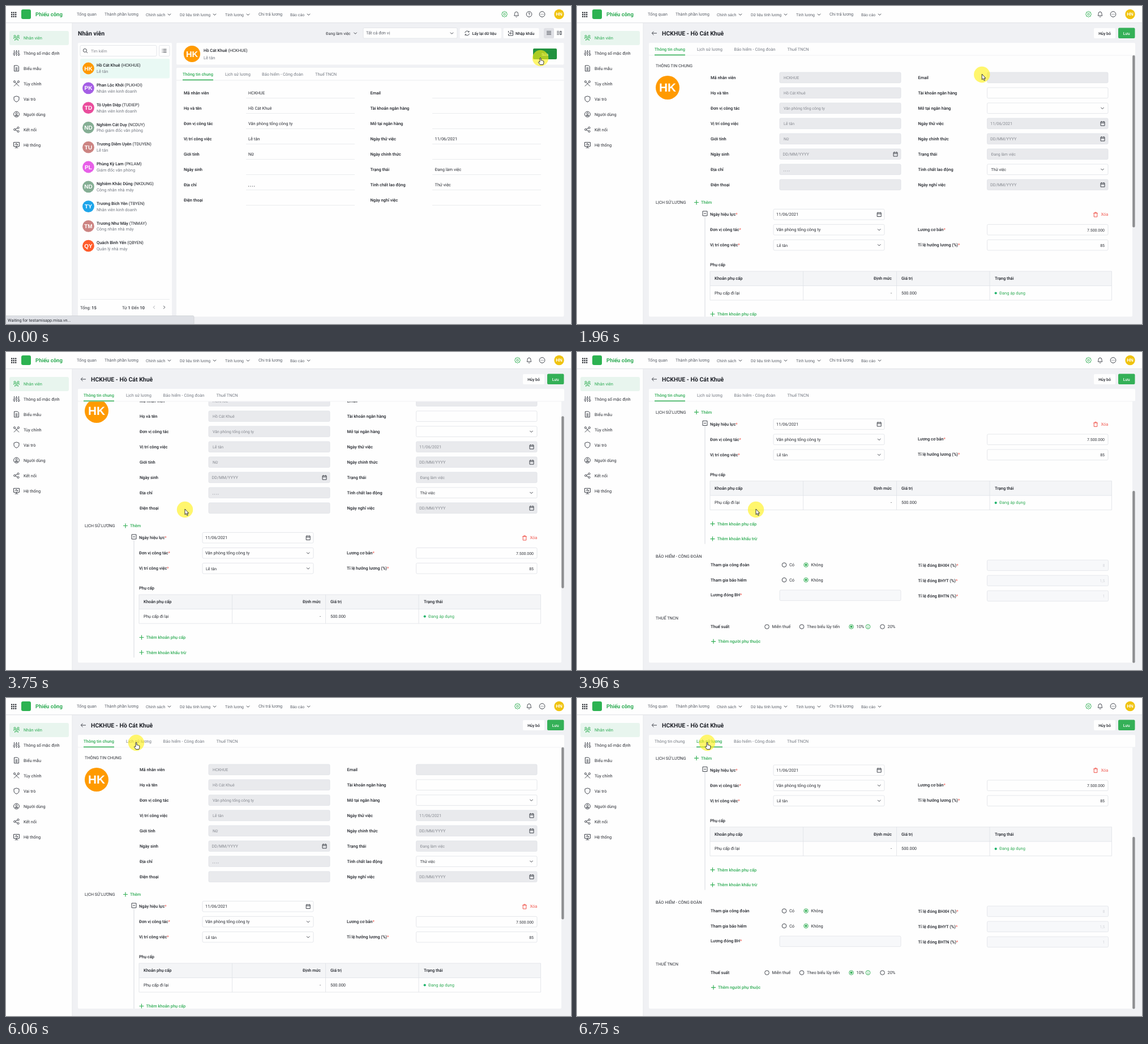
An HTML page for the animation above (8000 ms loop, 998 by 561 pixels).

```html
<!DOCTYPE html>
<html lang="vi">
<head>
<meta charset="utf-8">
<title>Nhân viên</title>
<style>
html, body { margin: 0; width: 100%; height: 100%; overflow: hidden; background: #f0f1f4; }
svg { display: block; width: 100vw; height: 100vh; }
text { font: 400 7.45px Roboto, "Noto Sans", sans-serif; fill: #2b2e35; text-rendering: geometricPrecision; white-space: pre; }
.b { font-weight: 500; fill: #1f2229; }
.s { font-size: 6.95px; }
.d { font-size: 7.35px; }
.m { fill: #767b84; }
.nav { fill: #5c616a; }
.off { fill: #868990; }
.faint { fill: #d3d5da; }
.g { fill: #2fac55; }
.red { fill: #f0554c; }
.w { fill: #fff; }
.r { text-anchor: end; }
.c { text-anchor: middle; }
.title { font-size: 10.5px; font-weight: 700; fill: #1f2229; }
.app { font-size: 9.5px; font-weight: 700; }
.face { font-family: "Liberation Sans", Arial, sans-serif; font-weight: 700; }
</style>
</head>
<body>
<svg id="stage" viewBox="0 0 998 561"></svg>
<script>
const GREEN = '#34b057', RED = '#f0554c', INK = '#41454d', EDGE = '#dfe1e6', WHITE = '#fefefe', MINT = '#e9f9f4';
const NAME = 'Hồ Cát Khuê', CODE = 'HCKHUE', STAR = '<tspan class="red">*</tspan>';

// y is the middle of the capitals
const text = (x, y, s, cls = '', style = '') =>
  `<text x="${x}" y="${y}" dy=".36em" class="${cls}" style="${style}">${s}</text>`;
const rect = (x, y, w, h, fill, r = 0, stroke = 'none') =>
  `<rect x="${x}" y="${y}" width="${w}" height="${h}" rx="${r}" fill="${fill}" stroke="${stroke}" stroke-width=".8"/>`;
const disc = (x, y, r, fill) => `<circle cx="${x}" cy="${y}" r="${r}" fill="${fill}"/>`;
const icon = (x, y, d, color = INK, w = 1) =>
  `<path transform="translate(${x} ${y})" d="${d}" fill="none" stroke="${color}" stroke-width="${w}" stroke-linejoin="round"/>`;
const line = (d, color = '#e5e7ea') => icon(0, 0, d, color, .8);
const group = (id, s, more = '') => `<g id="${id}" ${more}>${s}</g>`;
const ring = (r, x = 0, y = 0) => `M${x - r} ${y}a${r} ${r} 0 1 0 ${2 * r} 0a${r} ${r} 0 1 0 ${-2 * r} 0`;
const avatar = (x, y, r, color, s, size) =>
  disc(x, y, r, color) + text(x, y, s, 'w c face', `font-size:${size}px`);

const cog = 'M' + Array.from({ length: 16 }, (_, i) => {
  const a = i * Math.PI / 8, r = i % 2 ? 4.1 : 5.1;
  return (r * Math.cos(a)).toFixed(1) + ' ' + (r * Math.sin(a)).toFixed(1);
}).join('L') + 'Z' + ring(1.7);
const I = {
  down: 'M-2.6-1.3 0 1.3 2.6-1.3',
  cal: 'M-3.5-3H3.5V3.8H-3.5ZM-3.5-1H3.5M-2-4.2V-3M2-4.2V-3',
  plus: 'M-4 0H4M0-4V4',
  trash: 'M-3.8-2.6H3.8M-1.3-2.6V-4H1.3V-2.6M-2.8-2.6V4H2.8V-2.6',
  pencil: 'M-3.7 3.7-3 1 1.8-3.8 3.8-1.8-1 3Z',
  bell: 'M-4 2.5C-3 1.5-3 0-3-1A3 3.2 0 0 1 3-1C3 0 3 1.5 4 2.5ZM-1.2 4.2A1.3 1.3 0 0 0 1.2 4.2',
  help: ring(4.8) + 'M-1.4-1.2A1.4 1.4 0 1 1 0 .4V1M0 2.3V3',
  more: ring(4.8) + 'M-2.6 0h1M-.5 0h1M1.6 0h1',
  people: ring(1.5, -3, -3) + ring(1.5, 3, -3) + ring(1.5, 0, 0) + 'M-5 1.5V0H-2.5M5 1.5V0H2.5M-2.8 5V3H2.8V5',
  sliders: 'M-4-5V0M-4 3V5M0-5V-3M0 0V5M4-5V1M4 4V5' + ring(1.5, -4, 1.5) + ring(1.5, 0, -1.5) + ring(1.5, 4, 2.5),
  doc: 'M-4-5H2L4-3V5H-4ZM-2-1H2M-2 1H2M-2 3H2',
  tools: 'M-4.5 4.5 2.4-2.4M-2.4-2.4 4.5 4.5' + ring(1.6, 3.5, -3.5) + ring(1.6, -3.5, -3.5),
  shield: 'M0-5 4.5-3.5V0C4.5 3 2 4.5 0 5.2-2 4.5-4.5 3-4.5 0V-3.5Z',
  user: ring(4.9) + ring(1.6, 0, -1.5) + 'M-2.5 2.8V2.2Q0 0 2.5 2.2V2.8Z',
  share: ring(1.6, -3.2, 0) + ring(1.6, 3, -3.2) + ring(1.6, 3, 3.2) + 'M-1.8-.7 1.6-2.5M-1.8.7 1.6 2.5',
  monitor: 'M-5-4.5H5V2.5H-5ZM0 2.5V5M-3 5H3M-3-1H-1.2L0-3 1 .8 1.6-1H3',
  list: 'M-2-2.7H4M-2 0H4M-2 2.7H4M-4-2.7h1M-4 0h1M-4 2.7h1',
};

const employee = [
  ['Mã nhân viên', CODE, 'Email', ''],
  ['Họ và tên', NAME, 'Tài khoản ngân hàng', ''],
  ['Đơn vị công tác', 'Văn phòng tổng công ty', 'Mở tại ngân hàng', ''],
  ['Vị trí công việc', 'Lễ tân', 'Ngày thử việc', '11/06/2021'],
  ['Giới tính', 'Nữ', 'Ngày chính thức', ''],
  ['Ngày sinh', '', 'Trạng thái', 'Đang làm việc'],
  ['Địa chỉ', ', , , ,', 'Tính chất lao động', 'Thử việc'],
  ['Điện thoại', '', 'Ngày nghỉ việc', ''],
];
const staff = [
  [NAME, CODE, 'Lễ tân', '#ff9a00', 'HK'],
  ['Phan Lộc Khởi', 'PLKHOI', 'Nhân viên kinh doanh', '#a45ee5', 'PK'],
  ['Tô Uyên Diệp', 'TUDIEP', 'Nhân viên kinh doanh', '#ea4c9c', 'TD'],
  ['Nghiêm Cát Duy', 'NCDUY', 'Phó giám đốc văn phòng', '#85ae94', 'ND'],
  ['Trương Diễm Uyên', 'TDUYEN', 'Lễ tân', '#cc8482', 'TU'],
  ['Phùng Kỳ Lam', 'PKLAM', 'Giám đốc văn phòng', '#e760e8', 'PL'],
  ['Nghiêm Khắc Dũng', 'NKDUNG', 'Công nhân nhà máy', '#85ae94', 'ND'],
  ['Trương Bích Yên', 'TBYEN', 'Nhân viên kinh doanh', '#1ea5ea', 'TY'],
  ['Trương Như Mây', 'TNMAY', 'Công nhân nhà máy', '#cc8482', 'TM'],
  ['Quách Bình Yến', 'QBYEN', 'Quản lý nhà máy', '#ff5c2b', 'QY'],
];
const tabNames = ['Thông tin chung', 'Lịch sử lương', 'Bảo hiểm - Công đoàn', 'Thuế TNCN'];

const tabs = (xs, y, active) => tabNames.map((s, i) => text(xs[i], y, s, i === active ? 'b g' : 'm')).join('')
  + rect(xs[active], y + 9.6, active ? 46 : 54, 1.6, GREEN);

function frame() {
  const menu = [['Tổng quan', 125], ['Thành phần lương', 174], ['Chính sách', 247, 288], ['Dữ liệu tính lương', 307, 368],
    ['Tính lương', 387, 427], ['Chi trả lương', 446], ['Báo cáo', 502, 534]];
  const side = [['people', 'Nhân viên'], ['sliders', 'Thông số mặc định'], ['doc', 'Biểu mẫu'], ['tools', 'Tùy chỉnh'],
    ['shield', 'Vai trò'], ['user', 'Người dùng'], ['share', 'Kết nối'], ['monitor', 'Hệ thống']];
  let s = rect(0, 0, 998, 561, '#f0f1f4') + rect(116, 29, 1.5, 532, '#e7e8ec') + rect(0, 29, 116.5, 532, WHITE)
    + rect(0, 29, 998, 1.2, '#e3e4e8') + rect(0, 0, 998, 29, WHITE);
  for (let i = 0; i < 9; i++) s += rect(9 + i % 3 * 3.5, 10.5 + (i / 3 | 0) * 3.5, 2.3, 2.3, '#25282e', .5);
  s += rect(27, 6, 17, 17, '#2db352', 3) + text(52, 14.5, 'Phiếu công', 'g app');
  for (const [name, x, arrow] of menu)
    s += text(x, arrow ? 15 : 14.5, name, arrow ? 'nav s' : 'nav') + (arrow ? icon(arrow + .5, 15, I.down) : '');
  s += rect(6, 44, 105, 25, '#e8f5ee', 3);
  side.forEach(([key, name], i) => s += icon(18.5, 56 + 27 * i, I[key], i ? INK : GREEN) + text(31, 56 + 27 * i, name, i ? '' : 'g'));
  return s + icon(947, 14.5, I.more) + avatar(977, 14.5, 8.7, '#f0c30f', 'HN', 8);
}

function viewPage() {
  let s = icon(880.5, 14.5, cog, GREEN) + icon(901.5, 14.5, I.bell) + icon(924, 14.5, I.help)
    + text(127, 48, 'Nhân viên', 'title')
    + text(565, 48, 'Đang làm việc', 's') + icon(617, 48, I.down)
    + rect(631, 38.5, 166, 18.5, WHITE, 2, EDGE) + text(636, 47.5, 'Tất cả đơn vị', 'nav') + icon(787.5, 48, I.down)
    + rect(801.5, 39, 73.5, 18, WHITE, 2) + icon(814.5, 48, 'M-3.8-.6A3.8 3.8 0 0 1 3-2.4M3.4-4V-2H1.4M3.8.6A3.8 3.8 0 0 1-3 2.4M-3.4 4V2H-1.4')
    + text(823.5, 48, 'Lấy lại dữ liệu', 'b s')
    + rect(878.5, 39, 63, 18, WHITE, 2) + icon(891.5, 48, 'M-1-4H4V4H-4V1M-4-4V-1M3 0H-2M0-2-2 0 0 2') + text(900, 48, 'Nhập khẩu', 'b s')
    + rect(950, 39, 36, 18, WHITE, 2) + rect(950, 39, 18, 18, '#dfe0e5', 2)
    + icon(959, 47.5, 'M-4-2.7H4M-4 0H4M-4 2.7H4') + icon(977, 47.5, 'M-4-2.7H0M-4 0H0M-4 2.7H0M1.7-3H4V3H1.7Z')
    + rect(127, 65, 166, 483, WHITE, 2)
    + rect(131, 69.5, 135, 19, WHITE, 2, EDGE) + icon(140, 79, ring(3, -.6, -.6) + 'M1.6 1.6 4 4') + text(150, 79, 'Tìm kiếm', 's off')
    + rect(270.5, 69.5, 18.5, 19, WHITE, 2, EDGE) + icon(279.5, 79, I.list)
    + rect(131, 93, 158, 34.5, MINT, 2);
  staff.forEach(([name, code, job, color, initials], i) => {
    const y = 110 + 34.8 * i;
    s += avatar(145.5, y, 10.4, color, initials, 10) + text(160, y - 5.5, `${name} <tspan style="font-weight:400">(${code})</tspan>`, 'b')
      + text(160, y + 5.3, job, 'm');
  });
  s += line('M131 517.5H289') + text(131, 532, 'Tổng: <tspan class="b">15</tspan>')
    + text(205, 532, 'Từ <tspan class="b">1</tspan> Đến <tspan class="b">10</tspan>')
    + icon(261.5, 531.5, 'M1.3-2.6-1.3 0 1.3 2.6', '#a5a8ae') + icon(279.5, 531.5, 'M-1.3-2.6 1.3 0-1.3 2.6')
    + rect(301, 65, 684.5, 38.5, WHITE, 2) + avatar(328.5, 84.5, 14.6, '#ff9a00', 'HK', 14.5)
    + text(349, 78, `${NAME} <tspan style="font-weight:400">(${CODE})</tspan>`, 'b') + text(349, 91, 'Lễ tân', 'm')
    + rect(931, 75, 42, 19, '#22923f', 2) + text(952, 85, 'Sửa', 'w c s')
    + rect(301, 109, 684.5, 439, WHITE, 2) + line('M301 131H985.5') + tabs([312, 387, 452, 546], 120, 0);
  employee.forEach(([a, av, b, bv], i) => {
    const y = 153 + 27 * i;
    s += text(314, y, a, 'b') + text(428, y, av) + text(643.5, y, b, 'b') + text(757.5, y, bv)
      + line(`M424 ${y + 9.5}H616M753 ${y + 9.5}H945`);
  });
  return s + rect(-2, 546.5, 334, 16, '#dfe1e6', 2, '#cfd1d5') + text(3, 554, 'Waiting for testamisapp.misa.vn...', 'd');
}

function field(x, y, w, label, value) {
  const open = /^(Tài|Mở|Tính)/.test(label), date = /^Ngày/.test(label);
  return rect(x, y - 9.3, w, 18.6, open ? WHITE : '#e9eaed', 2, EDGE)
    + text(x + (date ? 5.5 : 7), y + (date ? 0 : .5), value || (date ? 'DD/MM/YYYY' : ''), (date ? 'd' : 's') + (open ? '' : ' off'))
    + (date ? icon(x + w - 9.5, y, I.cal) : /^(Mở|Tính)/.test(label) ? icon(x + w - 10, y, I.down) : '');
}
const addLink = (x, y, s) => icon(x, y, I.plus, GREEN, 1.2) + text(x + 8, y, s, 'b g');
const input = (x, y, w, glyph) => rect(x, y - 9.3, w, 18.6, WHITE, 2, EDGE) + (glyph ? icon(x + w - 9.3, y, glyph) : '');
const radio = (x, y, s, on) => icon(x, y, ring(3.8), on ? GREEN : INK) + (on ? disc(x, y, 2.1, GREEN) : '') + text(x + 9, y, s);
const paleField = (x, y, s) => rect(x, y - 9.3, 214, 18.6, '#f7f8fa', 2, '#e0e2e8') + text(x + 208, y + .5, s, 'r s faint');

function form() {
  let s = text(139, 105, 'THÔNG TIN CHUNG', 'd') + avatar(160, 144, 21, '#ff9a00', 'HK', 20.8);
  employee.forEach(([a, av, b, bv], i) => {
    const y = 126 + 27 * i;
    s += text(236, y, a, 'b') + field(358, y + .3, 214, a, av) + text(602.5, y, b, 'b') + field(724.5, y + .3, 213.5, b, bv);
  });
  s += text(139, 346.5, 'LỊCH SỬ LƯƠNG', 'd') + addLink(211, 346.5, 'Thêm')
    + line('M226 370V579', '#cfd2d7') + icon(226, 366, 'M-4-4H4V4H-4ZM-2 0H2')
    + text(235, 367.5, 'Ngày hiệu lực' + STAR, 'b') + input(347, 367.7, 196, I.cal) + text(352, 367.5, '11/06/2021', 'd')
    + icon(916, 368, I.trash, RED) + text(925.5, 367.5, 'Xóa', 'red')
    + text(235, 394.5, 'Đơn vị công tác' + STAR, 'b') + input(347, 394.7, 196, I.down) + text(352, 394.5, 'Văn phòng tổng công ty')
    + text(602, 394, 'Lương cơ bản' + STAR, 'b') + input(724.5, 394.7, 213.5) + text(932, 395, '7.500.000', 'r s')
    + text(235, 421.5, 'Vị trí công việc' + STAR, 'b') + input(347, 421.7, 196, I.down) + text(353, 422, 'Lễ tân', 's')
    + text(602, 421, 'Tỉ lệ hưởng lương (%)' + STAR, 'b') + input(724.5, 421.7, 213.5) + text(932, 422, '85', 'r s')
    + text(235, 456.5, 'Phụ cấp', 'b') + rect(235, 468, 709.5, 25.5, '#f4f5f7')
    + group('hover', rect(235, 493.5, 709.5, 25.5, MINT) + icon(908.5, 506.5, I.pencil) + icon(929, 506.5, I.trash, RED))
    + line('M235 468H944.5V519H235ZM235 493.5H944.5M399.5 468V519M564.5 468V519M729 468V519', EDGE)
    + text(243, 480.5, 'Khoản phụ cấp', 'b') + text(556, 480.5, 'Định mức', 'b r') + text(573, 480.5, 'Giá trị', 'b') + text(738, 480.5, 'Trạng thái', 'b')
    + text(243, 506, 'Phụ cấp đi lại') + text(556, 506, '-', 'r') + text(573, 506, '500.000')
    + disc(739.7, 506.5, 2.1, '#1fb36b') + text(746, 506, 'Đang áp dụng', 'g')
    + addLink(239.5, 543.5, 'Thêm khoản phụ cấp') + addLink(239.5, 570, 'Thêm khoản khấu trừ')
    + text(139, 601, 'BẢO HIỂM - CÔNG ĐOÀN', 'd');
  ['Tham gia công đoàn', 'Tham gia bảo hiểm'].forEach((label, i) => {
    const y = 616 + 26.5 * i;
    s += text(236, y, label, 'b') + radio(366, y, 'Có') + radio(404.5, y, 'Không', true);
  });
  s += text(236, 669, 'Lương đóng BH' + STAR, 'b') + paleField(358, 669.7, '');
  [['BHXH', '8'], ['BHYT', '1,5'], ['BHTN', '1']].forEach(([kind, v], i) => {
    const y = 616.3 + 27 * i;
    s += text(602.5, y, `Tỉ lệ đóng ${kind} (%)${STAR}`, 'b') + paleField(724.5, y + .4, v);
  });
  return s + text(139, 709.5, 'THUẾ TNCN', 'd') + text(236, 724.7, 'Thuế suất', 'b')
    + radio(335.5, 725, 'Miễn thuế') + radio(397, 725, 'Theo biểu lũy tiến') + radio(484.5, 725, '10%', true)
    + icon(514, 725, ring(3.8) + 'M0-2V-1.2M0-.5V2.2', GREEN) + radio(539.5, 725, '20%')
    + addLink(241, 751, 'Thêm người phụ thuộc');
}

function editPage() {
  return icon(903.5, 14.5, cog, GREEN) + icon(924, 14.5, I.bell) + icon(136.5, 48, 'M4.5 0H-4M-1-3.2-4.2 0-1 3.2')
    + rect(913, 39, 38, 18, WHITE, 2) + text(932, 48, 'Hủy bỏ', 'b s c')
    + rect(956, 38.5, 29.5, 18.5, GREEN, 2) + text(970.7, 48, 'Lưu', 'b s c w', 'fill:#fff')
    + rect(127, 65, 859, 22, WHITE, 2) + rect(127, 86, 854, 462, WHITE, 2) + line('M127 87H986', '#eceef0')
    + group('tabInfo', tabs([137, 212, 277.5, 371.5], 76, 0)) + group('tabPay', tabs([137, 211, 277, 371], 76, 1))
    + group('loaded', text(150, 48, `${CODE} - ${NAME}`, 'title') + `<g clip-path="url(#body)">${group('form', form())}</g>`
      + group('thumb', rect(981.2, 87, 4.4, 303.5, '#8e8f91', 2)));
}

const pointer = group('pointer', disc(0, 0, 14.2, 'rgba(255,240,20,.62)')
  + group('arrow', '<path d="M0-1V8.8L2.2 6.9 3.8 10.4 5.4 9.7 3.9 6.3H6.7Z"/>')
  + group('hand', '<path d="M-1 0Q0-1.4 1 0V4Q2 3.2 2.8 4.3 3.8 3.8 4.4 4.8 5.6 4.4 5.8 5.8V8.5L4.8 11.5H-.6L-3.6 7.2Q-3.4 5.6-1 7Z"/>'),
  'fill="#fff" stroke="#222" stroke-width=".9" stroke-linejoin="round"')
  .replace('<circle', '<circle stroke="none"');

const stage = document.getElementById('stage');
stage.innerHTML = '<clipPath id="body"><rect x="127" y="87.4" width="854" height="460.6"/></clipPath>'
  + frame() + group('view', viewPage()) + group('edit', editPage()) + pointer;

const el = id => document.getElementById(id);
const show = (id, on) => el(id).style.display = on ? '' : 'none';
const move = (id, x, y) => el(id).setAttribute('transform', `translate(${x} ${y})`);
const ease = (t, from, to) => {
  const u = Math.min(1, Math.max(0, (t - from) / (to - from)));
  return u * u * (3 - 2 * u);
};

const LOOP = 8000, SCROLL = 240.4;
const route = [[0, 944, 92], [1600, 944, 92], [1960, 716, 121], [2410, 337, 151], [2790, 188, 96], [3150, 188, 96],
  [3678, 316, 278], [5450, 316, 278], [6040, 230, 79], [LOOP, 230, 79]];

// Smooth speed through the route's bends, standing still at its rests
function slope(i, axis) {
  const a = route[i - 1], b = route[i], c = route[i + 1];
  if (!a || !c || a[axis] === b[axis] || b[axis] === c[axis]) return 0;
  return (c[axis] - a[axis]) / (c[0] - a[0]);
}
function place(t, axis) {
  const i = route.findIndex(p => p[0] > t) - 1, p = route[i], q = route[i + 1];
  const span = q[0] - p[0], u = (t - p[0]) / span, v = 1 - u, k = u * u * (3 - 2 * u);
  return p[axis] * (1 - k) + q[axis] * k + span * u * v * (v * slope(i, axis) - u * slope(i + 1, axis));
}

const start = performance.now();
function draw() {
  const t = (performance.now() - start) % LOOP;
  const editing = t >= 220, secondTab = t >= 6370;
  const scroll = SCROLL * (ease(t, 3678, 3960) - ease(t, 5180, 5450) + ease(t, 6380, 6750));
  const hand = !editing || t >= 4580 && t < 5230 || t >= 6050;
  show('view', !editing);
  show('edit', editing);
  show('loaded', t >= 480);
  show('tabInfo', !secondTab);
  show('tabPay', secondTab);
  show('hover', t >= 4310 && t < 5230);
  show('hand', hand);
  show('arrow', !hand);
  move('form', 0, -scroll);
  move('thumb', 0, scroll * 158 / SCROLL);
  move('pointer', place(t, 1), place(t, 2));
  requestAnimationFrame(draw);
}
draw();
</script>
</body>
</html>
```
